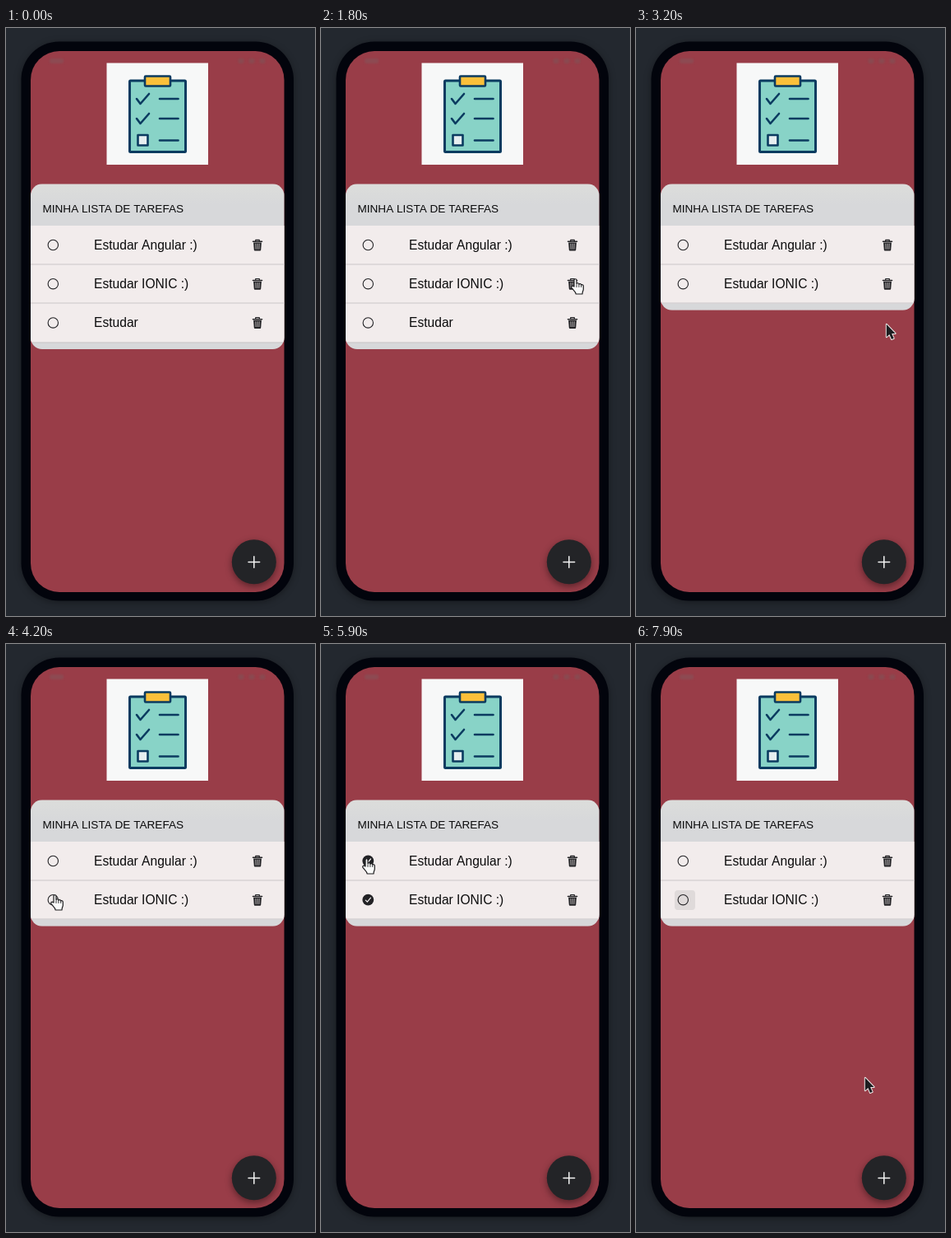
An HTML page with a canvas that plays this animation: 376x714 px, repeating every 8000 ms.

```html
<!DOCTYPE html>
<html lang="pt">
<head>
<meta charset="utf-8">
<title>Lista de tarefas</title>
<style>
  html, body { margin: 0; width: 100%; height: 100%; overflow: hidden; background: #23282f; }
  canvas { display: block; width: 376px; height: 714px; }
</style>
</head>
<body>
<canvas id="stage" width="376" height="714"></canvas>
<script>
const ctx = document.getElementById('stage').getContext('2d');
const LOOP = 8000, STEP = 100;
const TASKS = ['Estudar Angular :)', 'Estudar IONIC :)', 'Estudar'];
const ROW_TOP = 240, ROW_H = 47.2;
const RADIO_X = 57.3, TRASH_X = 306;
const INK = '#222225', NAVY = '#0b3b60', RED = '#993d48';

// Pointer tip: time, x, y
const POINTER = [
  [1500, 354, 178], [1800, 309, 304], [2100, 308, 319], [2600, 304, 359],
  [3200, 304, 359], [4000, 57, 303], [4200, 59, 304], [4700, 59, 304],
  [5200, 55, 270], [5400, 55, 260], [6800, 55, 260], [7200, 58, 303],
  [7400, 58, 303], [7900, 278, 526], [8000, 278, 526]
];

const between = (t, a, b) => t >= a && t < b;
const rowY = i => ROW_TOP + ROW_H * i + 23.5;

function pointerAt(t) {
  if (t < POINTER[0][0]) return null;
  const i = Math.max(1, POINTER.findIndex(k => k[0] >= t));
  const [t0, x0, y0] = POINTER[i - 1], [t1, x1, y1] = POINTER[i];
  const p = (t - t0) / (t1 - t0), e = p * p * (3 - 2 * p);
  return { x: x0 + (x1 - x0) * e, y: y0 + (y1 - y0) * e };
}

function box(x, y, w, h, r, fill, stroke, width) {
  ctx.beginPath();
  ctx.roundRect(x, y, w, h, r);
  paint(fill, stroke, width);
}

function disc(x, y, r, fill, stroke, width) {
  ctx.beginPath();
  ctx.arc(x, y, r, 0, 7);
  paint(fill, stroke, width);
}

function paint(fill, stroke, width) {
  if (fill) { ctx.fillStyle = fill; ctx.fill(); }
  if (stroke) { ctx.strokeStyle = stroke; ctx.lineWidth = width; ctx.stroke(); }
}

function line(points, color, width) {
  ctx.beginPath();
  points.forEach(([x, y]) => ctx.lineTo(x, y));
  paint(null, color, width);
}

function withShadow(color, blur, dy, draw) {
  ctx.save();
  ctx.shadowColor = color;
  ctx.shadowBlur = blur;
  ctx.shadowOffsetY = dy;
  draw();
  ctx.restore();
}

function text(str, x, y, size) {
  ctx.font = `${size}px "Liberation Sans", Arial, sans-serif`;
  ctx.fillStyle = '#0b0b0c';
  ctx.fillText(str, x, y);
}

function phone() {
  ctx.fillStyle = '#23282f';
  ctx.fillRect(0, 0, 376, 714);
  withShadow('rgba(0,0,0,.35)', 8, 2, () => box(18.5, 16.5, 331.5, 679, 46, '#02040c'));
  box(30, 28, 308.5, 657, 35, RED);

  ctx.save();
  ctx.filter = 'blur(1.2px)';
  box(53, 37, 17, 6, 2, '#8d4a52');
  [286, 299, 312].forEach(x => box(x - 3.5, 37, 7, 6, 2, '#8a4950'));
  ctx.restore();
}

function clipboard() {
  ctx.fillStyle = '#f7f8f8';
  ctx.fillRect(122.5, 42.5, 123.5, 123.5);
  box(150.5, 64, 68, 86.5, 1, '#88d3c7', NAVY, 3);
  box(169, 58.5, 31, 12, 1, '#fbc03a', NAVY, 2.6);
  [86, 110].forEach(y => {
    line([[159, y], [163.5, y + 6], [174, y - 6]], NAVY, 2.6);
    line([[187, y], [209.5, y]], NAVY, 2.6);
  });
  line([[187, 136.5], [209.5, 136.5]], NAVY, 2.6);
  box(160.5, 130, 12, 12.5, 0, '#e6eef0', NAVY, 2.6);
}

function radio(y, checked) {
  if (!checked) return disc(RADIO_X, y, 6.2, null, INK, 1.1);
  disc(RADIO_X, y, 6.9, INK);
  line([[RADIO_X - 3, y + .4], [RADIO_X - 1, y + 2.5], [RADIO_X + 3.2, y - 2.5]], '#f2eeee', 1.2);
}

function trash(y) {
  const x = TRASH_X;
  line([[x - 2.3, y - 4.5], [x - 2.3, y - 6.2], [x + 2.3, y - 6.2], [x + 2.3, y - 4.5]], INK, 1.2);
  line([[x - 5.5, y - 4.2], [x + 5.5, y - 4.2]], INK, 1.6);
  ctx.beginPath();
  ctx.moveTo(x - 4.9, y - 3);
  ctx.lineTo(x - 4.2, y + 6);
  ctx.quadraticCurveTo(x - 4.1, y + 7, x - 3.2, y + 7);
  ctx.lineTo(x + 3.2, y + 7);
  ctx.quadraticCurveTo(x + 4.1, y + 7, x + 4.2, y + 6);
  ctx.lineTo(x + 4.9, y - 3);
  ctx.fillStyle = INK;
  ctx.fill();
  [-2, 0, 2].forEach(d => line([[x + d * 1.1, y - 1.4], [x + d, y + 4.8]], '#d8d4d4', .8));
}

function list(count, checked, focused) {
  const top = 189.3, bottom = 248.4 + ROW_H * count;
  ctx.save();
  ctx.beginPath();
  ctx.roundRect(30, top, 308.5, bottom - top, 14);
  ctx.clip();
  const shade = ctx.createLinearGradient(0, top, 0, ROW_TOP);
  shade.addColorStop(0, '#dcdddb');
  shade.addColorStop(.5, '#d7d8da');
  ctx.fillStyle = shade;
  ctx.fillRect(30, top, 309, bottom - top);
  ctx.fillStyle = '#f2ecec';
  ctx.fillRect(30, ROW_TOP, 309, ROW_H * count);
  for (let i = 0; i < count; i++) {
    const y = rowY(i);
    ctx.fillStyle = '#cbc8c9';
    ctx.fillRect(30, Math.round(ROW_TOP + ROW_H * (i + 1)) - .5, 309, 1);
    if (focused === i) box(47, y - 11.8, 25, 24.2, 4, '#dfdada');
    radio(y, checked[i]);
    text(TASKS[i], 107, y + 5, 15.6);
    trash(y);
  }
  text('MINHA LISTA DE TAREFAS', 44.4, 224, 13.6);
  ctx.restore();
}

function addButton() {
  withShadow('rgba(0,0,0,.42)', 9, 3, () => disc(301.8, 648.3, 27, '#232427'));
  line([[295, 648.5], [308.6, 648.5]], '#f4f4f4', 1.5);
  line([[301.8, 641.7], [301.8, 655.3]], '#f4f4f4', 1.5);
}

const ARROW = new Path2D('M.8 .8V16.2L4.4 13L7 19L9.7 17.8L7.1 12H11.6Z');
const HAND = new Path2D('M4 10V2.3C4 .2 7 .2 7 2.3V6.6C7.5 5.3 9.8 5.5 9.9 7.2' +
  'C10.5 6 12.6 6.4 12.7 8C13.4 7.1 15.3 7.6 15.3 9.4V13.2C15.3 15 14 16 14 19' +
  'H6.2C6.2 16.5 3.2 14.6 .9 11.4C0 9.7 1.8 8.6 3 9.4Z');

function pointer({ x, y }, count) {
  const overButton = [RADIO_X + 1.5, TRASH_X].some(bx => Math.abs(x - bx) < 13) &&
    TASKS.some((_, i) => i < count && Math.abs(y - rowY(i)) < 13);
  ctx.save();
  if (overButton) {
    ctx.translate(x - 5, y);
    ctx.fillStyle = '#fafafa';
    ctx.fill(HAND);
    ctx.strokeStyle = '#1b1b1d';
    ctx.lineWidth = 1.2;
    ctx.stroke(HAND);
    [7, 9.9, 12.7].forEach(fx => line([[fx, 7.5], [fx, 10.5]], '#1b1b1d', .9));
  } else {
    ctx.translate(x, y);
    ctx.strokeStyle = '#eee6e6';
    ctx.lineWidth = 2;
    ctx.stroke(ARROW);
    ctx.fillStyle = '#1d1d20';
    ctx.fill(ARROW);
  }
  ctx.restore();
}

function draw(t) {
  const count = t < 3200 ? 3 : 2;
  const checked = [between(t, 5600, 6800), between(t, 4400, 7500)];
  ctx.lineCap = ctx.lineJoin = 'round';
  phone();
  clipboard();
  list(count, checked, t >= 7500 ? 1 : -1);
  addButton();
  const tip = pointerAt(t);
  if (tip) pointer(tip, count);
}

function tick() {
  draw(Math.floor(performance.now() % LOOP / STEP) * STEP);
  requestAnimationFrame(tick);
}
tick();
</script>
</body>
</html>
```
